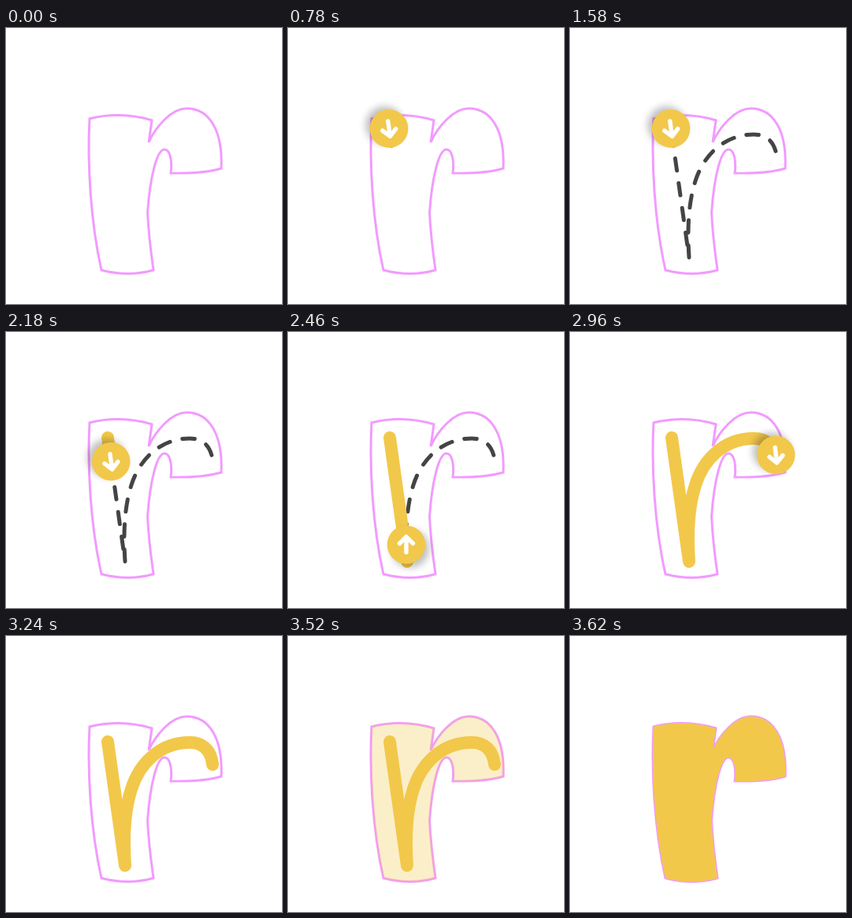
An HTML page for the animation above (4.8 s loop, 350 by 350 pixels).

```html
<!DOCTYPE html>
<html lang="en">
<head>
<meta charset="utf-8">
<title>Tracing the letter r</title>
<style>
  html, body { margin: 0; width: 100%; height: 100%; overflow: hidden; background: #fff; }
  svg { display: block; width: 100%; height: 100%; }
  path { fill: none; stroke-linecap: round; stroke-linejoin: round; }
  #outline { stroke: #f29bff; stroke-width: 3; stroke-linejoin: miter; }
  #dashes { stroke: #444; stroke-width: 5; }
  #trail { stroke: #f2c84b; stroke-width: 16; }
  #fill, #button circle { fill: #f2c84b; }
  #button .shadow { fill: #000; opacity: .25; filter: blur(5px); }
  #button path { stroke: #fff; stroke-width: 5.4; }
</style>
</head>
<body>
<svg viewBox="0 0 350 350">
  <path id="outline" d="M106 115Q145 105 185 117L181 145C190 125 210 102 229 102
    C258 102 275 130 273 178Q250 185 209 184C211 168 208 154 201 154
    C192 154 183 185 179.500 234Q181 265 187 307Q155 316 121 307C107 245 103 170 106 115Z"/>
  <path id="dashes" d="M129 134L151 291C149 262 149 225 159 194C169 162 195 135 233 135C250 135 260 145 262 163"/>
  <path id="trail"/>
  <g id="button">
    <circle class="shadow" cx="-11.500" cy="5" r="24"/>
    <circle cx="-6.500" r="24.300"/>
    <path d="M-16 0H3M-5 -8.500L3.500 0L-5 8.500"/>
  </g>
  <path id="fill"/>
</svg>
<script>
  const LOOP = 4800, PERIOD = 31.7, DASH = 15.5;
  const [outline, dashes, trail, button, fill] =
    ['outline', 'dashes', 'trail', 'button', 'fill'].map(id => document.getElementById(id));
  trail.setAttribute('d', dashes.getAttribute('d'));
  fill.setAttribute('d', outline.getAttribute('d'));
  const length = dashes.getTotalLength();

  const ramp = (t, from, to) => Math.min(1, Math.max(0, (t - from) / (to - from)));
  const ease = u => (1 - Math.cos(Math.PI * u)) / 2;

  function setDash(path, pattern) {
    path.style.visibility = pattern.length ? 'visible' : 'hidden';
    path.style.strokeDasharray = pattern.join(' ');
  }

  // Dash pattern cut off at the given distance along the path
  function dashesUpTo(end) {
    const pattern = [];
    for (let x = 0; x < end; x += PERIOD) pattern.push(Math.min(DASH, end - x), PERIOD - DASH);
    if (pattern.length) pattern[pattern.length - 1] = 999;
    return pattern;
  }

  function placeButton(s) {
    const p = trail.getPointAtLength(s);
    const start = Math.min(s, length - 0.5);
    const a = trail.getPointAtLength(start), b = trail.getPointAtLength(start + 0.5);
    const angle = Math.atan2(b.y - a.y, b.x - a.x) * 180 / Math.PI;
    button.setAttribute('transform', `translate(${p.x} ${p.y}) rotate(${angle})`);
  }

  function draw(t) {
    const s = length * ease(ramp(t, 1985, 2985));
    setDash(dashes, dashesUpTo(length * ease(ramp(t, 640, 1640))));
    setDash(trail, s > 0 ? [s, 999] : []);
    placeButton(s);
    button.style.opacity = ramp(t, 20, 180) - ramp(t, 3080, 3240);
    fill.style.opacity = ramp(t, 3480, 3620);
  }

  const begin = performance.now();
  function tick() {
    draw((performance.now() - begin) % LOOP);
    requestAnimationFrame(tick);
  }
  tick();
</script>
</body>
</html>
```
